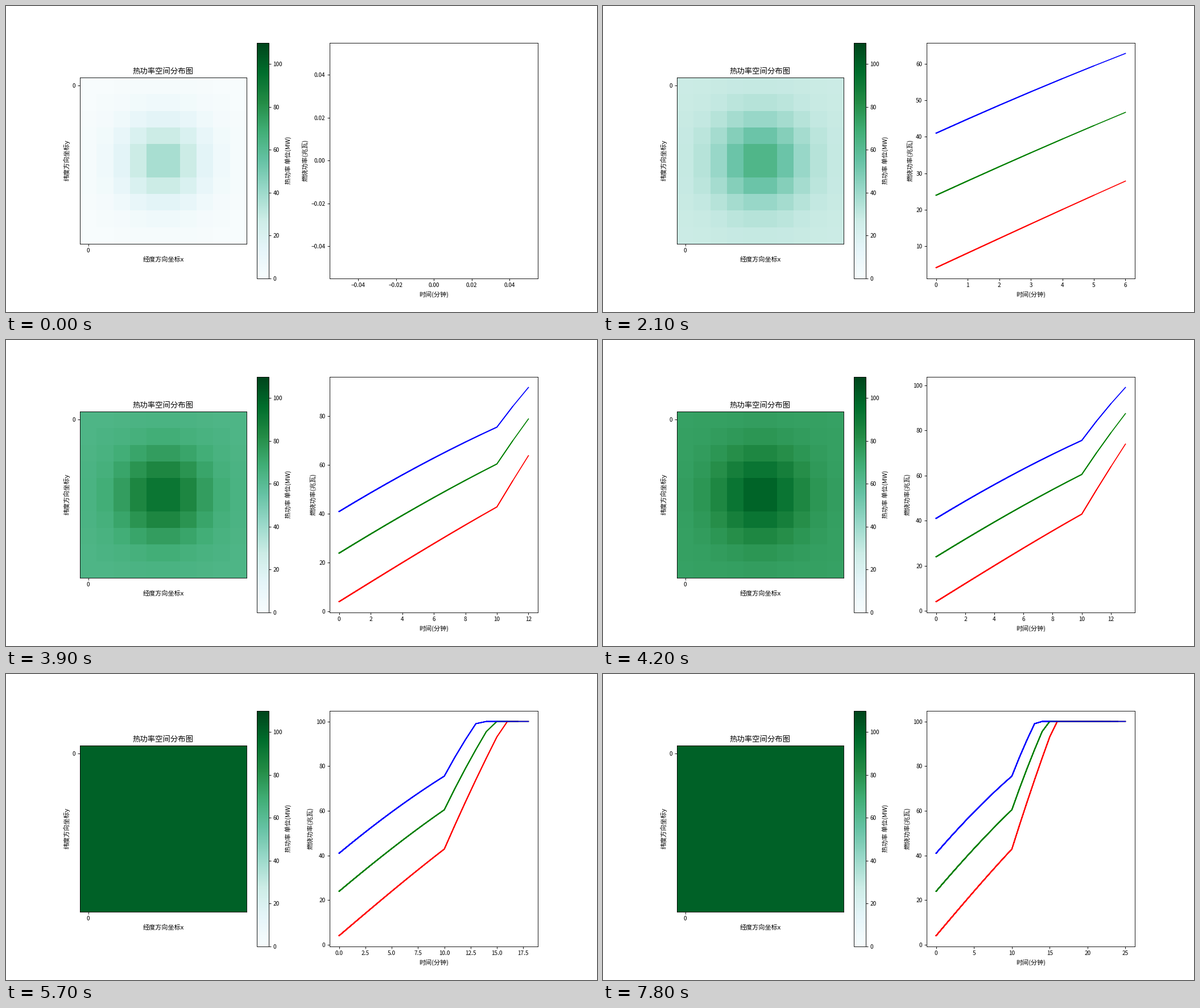
Write a matplotlib script that moves like this. It is 1039 by 539 pixels and loops after 8 s.

```python
import numpy as np
import matplotlib.pyplot as plt
from matplotlib.animation import FuncAnimation

plt.rcParams.update({
    "font.family": ["Noto Sans CJK JP", "DejaVu Sans"],
    "xtick.labelsize": 9,
    "ytick.labelsize": 9,
})

DPI = 80
TICK_MS, LOOP_MS, STEP_TICKS = 100, 8000, 3
STEPS = 27
FULL = 100.0

# Hot spot in the middle of a 10 x 10 grid
offset = np.arange(10) - 4.5
r2 = offset[:, None] ** 2 + offset[None, :] ** 2
hot = 0.4 * np.exp(-r2 / (2 * 1.8 ** 2))


def growth(n):
    """Shared heating level after n minutes; it speeds up after minute 11."""
    if n <= 11:
        return np.sin(0.0402 * n)
    m = n - 11
    return np.sin(0.0402 * 11) + 0.108 * m - 0.0015 * m * m


def power(n):
    s = growth(n)
    fade = max(0.0, 1 - 0.564 * s ** 1.86)
    return np.minimum(FULL, FULL * (s + hot * fade))


def span(lo, hi):
    if lo == hi:
        lo, hi = lo - 0.05, hi + 0.05
    pad = 0.05 * (hi - lo)
    return lo - pad, hi + pad


maps = [power(n) for n in range(STEPS)]
probes = [("r", 0, 0), ("g", 3, 3), ("b", 4, 4)]
curves = [(color, [m[row, col] for m in maps[1:]]) for color, row, col in probes]

fig, (heat_ax, line_ax) = plt.subplots(1, 2, figsize=(1039 / DPI, 539 / DPI), dpi=DPI)

image = heat_ax.imshow(maps[0], cmap="BuGn", vmin=0, vmax=110)
heat_ax.set_xticks([0])
heat_ax.set_yticks([0])
heat_ax.set_title("热功率空间分布图")
heat_ax.set_xlabel("经度方向坐标x")
heat_ax.set_ylabel("纬度方向坐标y")
fig.colorbar(image, ax=heat_ax, label="热功率 单位(MW)")

line_ax.set_xlabel("时间(分钟)")
line_ax.set_ylabel("燃烧功率(兆瓦)")

# Curves pile up step by step, so older stretches look heavier
layers = [
    [line_ax.plot(range(k), ys[:k], color=color)[0] for color, ys in curves]
    for k in range(STEPS)
]


def draw(tick):
    k = min(tick // STEP_TICKS, STEPS - 1)
    image.set_data(maps[k])
    for j, layer in enumerate(layers):
        for line in layer:
            line.set_visible(j <= k)
    seen = [y for _, ys in curves for y in ys[:k]] or [0]
    line_ax.set_xlim(span(0, max(k - 1, 0)))
    line_ax.set_ylim(span(min(seen), max(seen)))
    return [image]


anim = FuncAnimation(fig, draw, frames=LOOP_MS // TICK_MS, interval=TICK_MS,
                     repeat=True, repeat_delay=0, blit=False)
plt.show()
```
